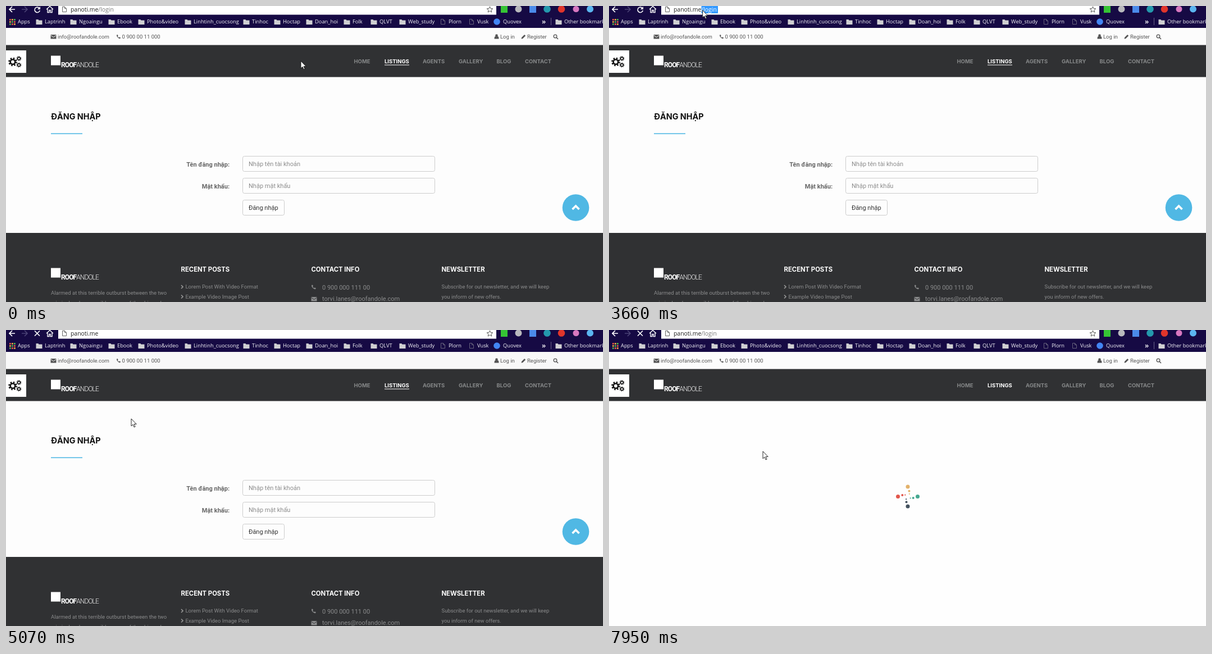
An HTML page with a canvas that plays this animation: 1063x527 px, repeating every 8000 ms.

```html
<!DOCTYPE html>
<html lang="vi">
<head>
<meta charset="utf-8">
<title>Đăng nhập</title>
<style>
html, body { margin: 0; width: 100%; height: 100%; overflow: hidden; background: #fdfdfd; }
canvas { display: block; }
</style>
</head>
<body>
<canvas id="stage" width="1063" height="527"></canvas>
<script>
const c = document.getElementById('stage').getContext('2d');
const LOOP = 8000;
const UI = '"Open Sans", sans-serif', BODY = 'Roboto, sans-serif', HEAD = 'Inter, sans-serif';
const PURPLE = '#160a44', DARK = '#303133', BLUE = '#50b8e4', SELECT = '#3399ff';
// Moments of the story, in ms.
const LIST = 3940, ENTER = 4360, REDIRECT = 5400, RELOAD = 6980;

// The screen refreshes in bursts: [start, end, count].
const bursts = [[0, 0, 1], [150, 1090, 8], [1210, 2130, 7], [2280, 2280, 1], [2560, 3240, 6],
  [3510, 3660, 2], [3940, 4920, 8], [5070, 6030, 8], [6150, 6570, 4], [6850, 7820, 8]];
const ticks = bursts.flatMap(([a, b, n]) =>
  Array.from({length: n}, (_, k) => a + (b - a) * k / Math.max(1, n - 1)));

// Pointer path: [time, x, y].
const path = [[0, 525, 98], [420, 440, 106], [1090, 114, 62], [1210, 118, 58], [1880, 196, 9],
  [2130, 199, 9], [2560, 194, 8], [3240, 166, 7], [3940, 167, 8], [4300, 167, 8],
  [5070, 223, 158], [6030, 226, 187], [6570, 274, 216], [LOOP, 274, 216]];

function pointerAt(t) {
  const i = path.findIndex(p => p[0] > t);
  const [t0, x0, y0] = path[i - 1], [t1, x1, y1] = path[i];
  const k = (t - t0) / (t1 - t0);
  return [x0 + (x1 - x0) * k, y0 + (y1 - y0) * k];
}

function rect(x, y, w, h, color) {
  c.fillStyle = color;
  c.fillRect(x, y, w, h);
}

function text(s, x, y, size, color, family = BODY, weight = 400, spacing = 0) {
  c.font = `${weight} ${size}px ${family}`;
  c.letterSpacing = spacing + 'px';
  c.fillStyle = color;
  c.fillText(s, x, y);
  return x + c.measureText(s).width;
}

function disc(x, y, r, color) {
  c.fillStyle = color;
  c.beginPath();
  c.arc(x, y, r, 0, 7);
  c.fill();
}

function ring(x, y, r, color, width) {
  c.strokeStyle = color;
  c.lineWidth = width;
  c.beginPath();
  c.arc(x, y, r, 0, Math.PI * 2);
  c.stroke();
}

// SVG path data placed at x, y; no width means filled.
function shape(d, x, y, color, width, scale = 1) {
  c.save();
  c.translate(x, y);
  c.scale(scale, scale);
  c.fillStyle = c.strokeStyle = color;
  c.lineWidth = width || 1;
  const p = new Path2D(d);
  width ? c.stroke(p) : c.fill(p);
  c.restore();
}

const page = (x, y, color) => shape('M.5 .5h4l3 3v6h-7zM4.5 .5v3h3', x, y, color, 1);
const folder = x => shape('M0 1h4l1 1.5h6v7.5h-11z', x, 23, '#cfcfd2');
const chevron = (x, y) => shape('M0 0l3 3l-3 3', x, y, '#999', 1.6);
const phone = (x, y, scale, color) =>
  shape('M0 1Q1 -.5 2 .2L3 2.2L2 3.2Q2.8 5 4.6 5.8L5.6 4.8L7.6 5.8Q8 7 6.8 7.8Q5 8.2 2.4 5.8Q-.3 3 0 1z', x, y, color, 0, scale);

function envelope(x, y, color, gap) {
  rect(x, y, 10, 7.5, color);
  shape('M0 1l5 3.6l5 -3.6', x, y, gap, 1);
}

function lens(x, y, color) {
  ring(x, y, 2.8, color, 1.3);
  shape('M2 2l3 3', x, y, color, 1.6);
}

function gear(x, y, r) {
  const tooth = Math.PI * r / 8;
  ring(x, y, r * .65, '#111', r * .4);
  c.setLineDash([tooth, tooth]);
  ring(x, y, r, '#111', r * .4);
  c.setLineDash([]);
}

function field(y, w, label, color) {
  c.strokeStyle = '#ccc';
  c.lineWidth = 1;
  c.beginPath();
  c.roundRect(421.5, y + .5, w, 27, 3);
  c.stroke();
  text(label, 432, y + 17.5, 11, color);
}

function logo(y) {
  rect(80, y, 17, 17, '#fff');
  const x = text('ROOF', 98, y + 20, 12, '#fff', BODY, 700, -.9);
  text('ANDOLE', x, y + 20, 12, '#eee', BODY, 300, -.9);
}

function toolbar(t, pointerX) {
  rect(0, 0, 1063, 39, PURPLE);
  rect(93, 0, 780, 15.5, '#fff');
  shape('M11 6H1M6 1L1 6L6 11', 5, 0, '#fff', 1.7);
  shape('M0 6H10M5 1L10 6L5 11', 28, 0, '#4a4275', 1.7);
  if (t >= ENTER) shape('M0 0l9 9M9 0l-9 9', 51, 1.5, '#fff', 1.7);
  else {
    shape('M8.5 3A4.7 4.7 0 1 0 9.3 7', 51, 1, '#fff', 1.6);
    shape('M10 0v5h-5z', 51, 1, '#fff');
  }
  shape('M0 6L6 .5L12 6M2 5v6.5h2.8v-4h2.4v4h2.8v-6.5', 72, 0, '#fff', 1.4);

  page(100, 1, '#666');
  const end = text('panoti.me', 115, 9.5, 10.4, '#222', UI);
  if (t < LIST || t >= REDIRECT) {
    text('/login', end, 9.5, 10.4, '#777', UI);
    if (t >= 2560 && t < LIST) {
      const left = t >= 3100 ? end : Math.max(end, pointerX);
      c.save();
      c.beginPath();
      c.rect(left, 0, 194 - left, 13);
      c.clip();
      rect(left, 0, 40, 13, SELECT);
      text('/login', end, 9.5, 10.4, '#fff', UI);
      c.restore();
    }
  }
  rect(881, 0, 12, 12, '#35c435');
  disc(912.5, 5.5, 6, '#b9b9bd');
  rect(932, 0, 12, 12, '#4b8bea');
  disc(963.5, 5.5, 6.3, '#2499ad');
  disc(989, 5.5, 6.3, '#e0352b');
  disc(1015, 5.5, 5.5, '#d878c0');
  disc(1040, 5.5, 6, '#5bb5f0');
}

function bookmarks() {
  shape('M5.5 .5l1.5 3.5l3.8 .3l-2.9 2.5l.9 3.7l-3.3 -2l-3.3 2l.9 -3.7l-2.9 -2.5l3.8 -.3z', 856, .5, '#555', 1);
  const dots = ['#e2574c', '#e8a33d', '#4caf50'];
  for (let i = 0; i < 9; i++) {
    const row = i / 3 | 0;
    rect(6 + i % 3 * 4, 23 + row * 4, 2.8, 2.8, dots[(i + row) % 3]);
  }
  const item = (s, x) => text(s, x, 31, 9.3, '#f4f4f8', UI);
  item('Apps', 21);
  [['Laptrinh', 69], ['Ngoaingu', 130], ['Ebook', 198], ['Photo&video', 251], ['Linhtinh_cuocsong', 334],
    ['Tinhoc', 438], ['Hoctap', 493], ['Doan_hoi', 550], ['Folk', 617], ['QLVT', 665],
    ['Web_study', 716], ['Other bookmarks', 994]].forEach(([s, x]) => {
    folder(x - 15.5);
    item(s, x);
  });
  page(774, 23, '#66627c');
  item('Plorn', 788);
  page(825, 23, '#66627c');
  item('Vusk', 839);
  disc(874, 28, 5.8, '#4285f4');
  item('Quovex', 885);
  text('»', 954, 31.5, 13, '#fff', UI, 600);
  rect(970, 21, 1, 13, '#6b6488');
}

function header(barColor, underline) {
  rect(0, 39, 1063, 31, barColor);
  const grey = '#555';
  envelope(79.5, 51, grey, barColor);
  text('info@roofandole.com', 92, 58, 9.5, grey);
  phone(197, 51, .9, grey);
  text('0 900 00 11 000', 206.5, 58, 9.5, grey);
  disc(873.5, 52.5, 2.3, grey);
  shape('M0 4.5Q0 0 2 0h4Q8 0 8 4.5z', 869.5, 54, grey);
  text('Log in', 880, 58, 9.5, grey);
  shape('M0 8l.6 -2.6l5 -5l2 2l-5 5z', 917.5, 50.5, grey);
  text('Register', 928, 58, 9.5, grey);
  lens(978, 54, grey);

  rect(0, 69.5, 1063, 57, DARK);
  rect(0, 79, 36, 40, '#fff');
  gear(12, 99.5, 6.5);
  gear(23, 93.5, 3.6);
  gear(23, 105, 3.6);
  logo(88.5);
  [['HOME', 619.5], ['LISTINGS', 674], ['AGENTS', 742], ['GALLERY', 806], ['BLOG', 873.5], ['CONTACT', 924]]
    .forEach(([s, x]) => text(s, x, 101.5, 9.5, s == 'LISTINGS' ? '#fff' : '#868889', HEAD, 700));
  if (underline) rect(674, 104.5, 44, 1, '#fff');
}

function loginPage() {
  text('ĐĂNG NHẬP', 80, 202, 14.4, '#111', HEAD, 700);
  rect(80, 226.5, 56, 1.6, BLUE);
  c.textAlign = 'right';
  text('Tên đăng nhập:', 398, 286, 11, '#666', BODY, 700);
  text('Mật khẩu:', 398, 325, 11, '#666', BODY, 700);
  c.textAlign = 'left';
  field(267, 342, 'Nhập tên tài khoản', '#8c8c8c');
  field(306, 342, 'Nhập mật khẩu', '#8c8c8c');
  field(345, 74, 'Đăng nhập', '#333');

  rect(0, 404, 1063, 123, DARK);
  logo(466.5);
  const grey = '#8b8c8d';
  const line = (s, x, y, size = 9.5) => text(s, x, y, size, grey);
  line('Alarmed at this terrible outburst between the two', 80, 514);
  line('criminal and responsible power of the ship and', 80, 531.5);
  [['RECENT POSTS', 311.5], ['CONTACT INFO', 543.5], ['NEWSLETTER', 775.5]]
    .forEach(([s, x]) => text(s, x, 473, 11.3, '#fff', HEAD, 700));
  chevron(312, 497);
  line('Lorem Post With Video Format', 319.5, 503);
  chevron(312, 514.5);
  line('Example Video Image Post', 319.5, 521);
  phone(544, 496.5, 1, grey);
  line('0 900 000 111 00', 563, 504.5, 11);
  envelope(543.5, 518, grey, DARK);
  line('torvi.lanes@roofandole.com', 563, 525, 11);
  line('Subscribe for out newsletter, and we will keep', 775.5, 503);
  line('you inform of new offers.', 775.5, 521);

  disc(1014.5, 359, 23.8, BLUE);
  shape('M0 6l6 -6l6 6', 1008.5, 356, '#fff', 3.6);
}

function spinner(t) {
  ['#e3b26b', '#45a890', '#44525f', '#e2574c'].forEach((color, i) => {
    // Inner dots lead the outer one.
    [[17.5, 3.5, 0], [10, 2, .25], [5.5, 1.1, .55]].forEach(([d, r, lead]) => {
      const a = i * Math.PI / 2 + lead + (t - 7820) / 250;
      disc(532 + d * Math.sin(a), 296.5 - d * Math.cos(a), r, color);
    });
  });
}

function suggestions() {
  rect(0, 19.5, 1063, 125.5, '#fff');
  rect(0, 23, 1063, 19.5, SELECT);
  rect(0, 145, 1063, 1, '#d6d6d6');
  rect(165, 1, 1, 11, '#222');
  const site = ' – Roofandole | Property Single', find = ' – Quovex Search';
  const green = '#15803c', teal = '#2a92a8', grey = '#808080';
  // Runs of [text, colour, weight].
  [
    [['panoti.me', '#7dffc0', 700], [site, '#b8dcff']],
    [['panoti.me', '#222'], [find, grey]],
    [['panoti.me', green, 700], ['/login', teal], [site, grey]],
    [['panoti meaning', '#000', 700], [find, grey]],
    [['panoti meaning in english', '#000', 700]],
    [['panoti.me', green, 700], ['/register', green], [site, grey]]
  ].forEach((runs, i) => {
    const y = 36.5 + i * 19.8;
    if ([1, 3, 4].includes(i)) lens(102.5, y - 5, '#666');
    else page(100, y - 9, i ? '#666' : '#fff');
    runs.reduce((x, [s, color, weight]) => text(s, x, y, 10.4, color, UI, weight), 115);
  });
}

function pointer(t, x, y) {
  const overSelection = t >= 3100 && t < LIST;
  if (y < 16 && !overSelection) {
    shape('M-2 -5.5h1.5l.5 .5l.5 -.5h1.5M0 -5v10M-2 5.5h1.5l.5 -.5l.5 .5h1.5', x + .5, y, '#000', 1);
    return;
  }
  const d = 'M0 0v13l3 -2.7l2.1 4.7l2 -.9l-2.1 -4.5h4.2z';
  shape(d, x, y, '#fff');
  shape(d, x, y, '#111', .9);
}

function draw(now) {
  const clock = now % LOOP;
  const t = ticks.findLast(k => k <= clock);
  const [x, y] = pointerAt(t);
  const loading = t >= RELOAD, listOpen = t >= LIST && t < ENTER;
  rect(0, 0, 1063, 527, loading ? '#fefefe' : '#fdfdfd');
  header(t >= ENTER && !loading ? '#f8f8f8' : '#fcfcfc', !loading);
  loading ? spinner(t) : loginPage();
  toolbar(t, x);
  listOpen ? suggestions() : bookmarks();
  pointer(t, x, y);
}

const start = performance.now();
function loop() {
  draw(performance.now() - start);
  requestAnimationFrame(loop);
}
loop();
</script>
</body>
</html>
```
